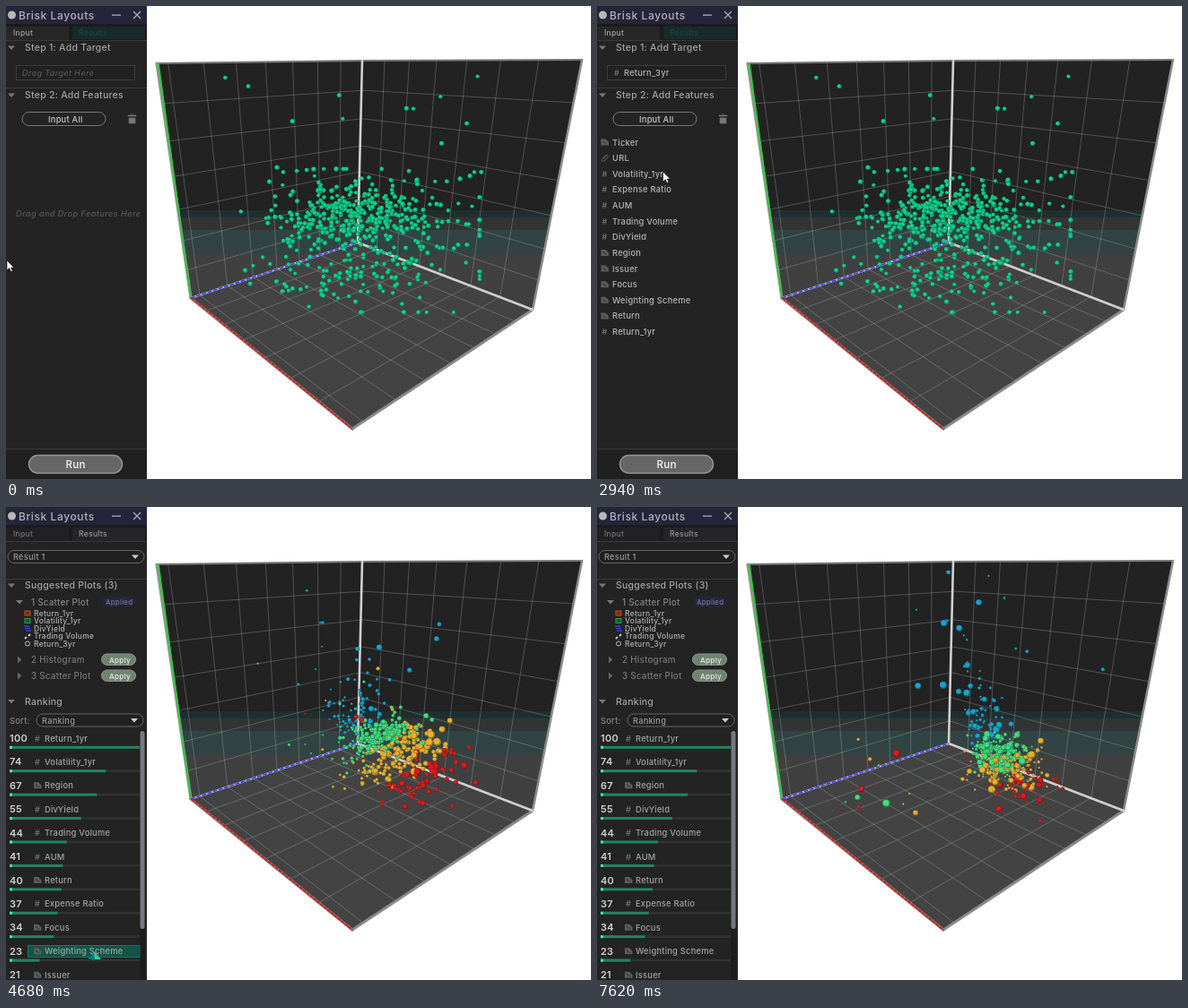
Recreate the animation shown at these times as an HTML page with a canvas. Size 652x528 px, loop 7.68 s.

```html
<!DOCTYPE html>
<html lang="en">
<head>
<meta charset="utf-8">
<title>Feature ranking</title>
<style>
html, body { margin: 0; width: 652px; height: 528px; overflow: hidden; background: #fff; }
canvas, svg { position: absolute; left: 0; top: 0; }
svg { overflow: hidden; }
text { font-family: Inter, Roboto, sans-serif; font-weight: 500; letter-spacing: .25px; dominant-baseline: central; white-space: pre; }
</style>
</head>
<body>
<canvas id="box" width="652" height="528"></canvas>
<canvas id="dots" width="652" height="528"></canvas>
<svg id="panel" width="157" height="528"></svg>
<script>
const LOOP = 7680;
const $ = id => document.getElementById(id);
const clamp = (v, a = 0, b = 1) => Math.min(b, Math.max(a, v));
const ease = p => p * p * (3 - 2 * p);
const mix = (a, b, p) => a + (b - a) * p;

// ---- Chart box: back corner O, its neighbours, and the outer corners ----
const O = [392, 264], T = [397, 61], L = [206, 326], TL = [168, 64],
      R = [587, 339], TR = [642, 60], F = [386, 472];
const bx = $('box').getContext('2d');

// Maps the unit square onto a quad in perspective.
function projector([a, b, c, d]) {
  const sx = a[0] - b[0] + c[0] - d[0], sy = a[1] - b[1] + c[1] - d[1];
  const ux = b[0] - c[0], uy = b[1] - c[1], vx = d[0] - c[0], vy = d[1] - c[1];
  const den = ux * vy - vx * uy;
  const g = (sx * vy - vx * sy) / den, h = (ux * sy - sx * uy) / den;
  return (u, v) => [0, 1].map(i =>
    ((b[i] - a[i] + g * b[i]) * u + (d[i] - a[i] + h * d[i]) * v + a[i]) / (g * u + h * v + 1));
}
function line(p, q, color, width, dash = []) {
  bx.strokeStyle = color;
  bx.lineWidth = width;
  bx.setLineDash(dash);
  bx.beginPath();
  bx.moveTo(...p);
  bx.lineTo(...q);
  bx.stroke();
}
function face(quad, fill, cols) {
  bx.fillStyle = fill;
  bx.beginPath();
  quad.forEach(p => bx.lineTo(...p));
  bx.fill();
  const at = projector(quad), ink = 'rgba(190,205,200,.28)';
  for (let k = 1; k < cols; k++) line(at(k / cols, 0), at(k / cols, 1), ink, 1);
  for (let k = 1; k < 7; k++) line(at(0, k / 7), at(1, k / 7), ink, 1);
}
function drawBox() {
  const sky = bx.createLinearGradient(0, 0, 0, 528);
  let last = '#222';
  for (const [y, c] of [[228, '#1f2f2f'], [236, '#323434'], [250, '#324343'], [277, '#404040']]) {
    sky.addColorStop(y / 528, last);
    sky.addColorStop(y / 528, last = c);
  }
  face([O, L, TL, T], sky, 7.3);
  face([O, R, TR, T], sky, 7);
  face([O, L, F, R], '#434343', 7.3);
  bx.lineCap = 'round';
  line(TL, T, '#777', 1.8);
  line(T, TR, '#777', 1.8);
  line(TR, R, '#8c8c8c', 2.5);
  line(F, R, '#8a8a8a', 2.8);
  line(O, R, '#d0d0d0', 2.6);
  line(O, T, '#d0d0d0', 2.6);
  line(TL, L, '#8a9a8a', 3.2);
  line([TL[0] + 2, TL[1]], L, '#1fd02f', 1.6);
  line(L, O, '#c8c8e0', 2.2);
  line(L, F, '#8c8080', 3.2);
  bx.lineCap = 'butt';
  line(L, O, '#3838e8', 1.5, [5, 1.5]);
  line([L[0] + 1, L[1]], F, '#d01818', 1.8, [4, 1]);
}

// ---- Data points ----
let seed = 20;
const rnd = () => (seed = (seed * 16807) % 2147483647) / 2147483647;
const gauss = () => Math.sqrt(-2 * Math.log(rnd())) * Math.cos(2 * Math.PI * rnd());
const COLORS = ['#16a5d0', '#42de84', '#e8b030', '#d61c1e'];

// A dense cloud above the floor and a thinner one below it, sorted by
// position into four colour classes that settle from high to low.
function cloudPoint() {
  const low = rnd() < .2, wide = rnd() < .35 ? 1.45 : 1;
  const x = clamp(393 + 45 * wide * gauss(), 262, 528);
  const y = clamp(low ? 302 + 20 * gauss() : 234 + 18 * wide * gauss(), 182, 342);
  const c = clamp(Math.floor((x - 390) / 90 + (y - 240) / 60 + .35 * gauss() + 1.7), 0, 3);
  const tail = c ? 0 : -30 * Math.log(rnd());
  return {
    x, y, c,
    ex: 438 + 11 * c + (11 + 3.5 * c) * gauss() - tail * .25,
    ey: Math.max(70, 260 + 16 * c + 12 * gauss() - tail)
  };
}
// Strays drift either high up or out over the floor.
function strayPoint(_, i) {
  const high = i % 2;
  return {
    x: 235 + 300 * rnd(), y: 200 - 125 * rnd() ** 2,
    c: high ? 0 : Math.floor(1 + 3 * rnd()),
    ex: high ? 425 + 45 * gauss() : 260 + 100 * rnd(),
    ey: high ? 70 + 130 * rnd() : 240 + 115 * rnd()
  };
}
const points = [...Array.from({ length: 530 }, cloudPoint), ...Array.from({ length: 24 }, strayPoint)];
for (const d of points) {
  d.r = 1.1 + 3 * rnd() ** 3.5;
  d.s = 2.1 + .6 * rnd();
}

const dc = $('dots').getContext('2d');
function disc(x, y, r, color) {
  dc.fillStyle = color;
  dc.beginPath();
  dc.arc(x, y, r, 0, 7);
  dc.fill();
}
function drawDots(t) {
  const p = ease(clamp((t - 4170) / 1020));
  const bump = Math.sin(Math.PI * p);
  dc.clearRect(0, 0, 652, 528);
  for (const d of points) {
    const x = mix(d.x, d.ex, p), y = mix(d.y, d.ey, p);
    const depth = clamp((x - 270) / 150, .5, 1.4);
    const r = mix(d.s, d.r, p) * mix(1, depth, bump);
    disc(x, y, r, p > 0 ? COLORS[d.c] : '#10d28e');
    disc(x, y, r, 'rgba(0,0,0,.36)');
    disc(x - r * .12, y - r * .12, r * .8, p > 0 ? COLORS[d.c] : '#10d28e');
  }
}

// ---- Side panel ----
const txt = (x, y, s, size = 9.3, fill = '#b4b4b4', more = '') =>
  `<text x="${x}" y="${y}" font-size="${size}" fill="${fill}" ${more}>${s}</text>`;
const rect = (x, y, w, h, fill, more = '') =>
  `<rect x="${x}" y="${y}" width="${w}" height="${h}" fill="${fill}" ${more}/>`;
const path = (d, more) => `<path d="${d}" ${more}/>`;
const group = (id, s) => `<g id="${id}">${s}</g>`;
const rule = y => rect(0, y, 157, 1, '#393939');
const down = (x, y, c = '#777') => path(`M${x - 4} ${y - 2}h8l-4 4.5z`, `fill="${c}"`);
const right = (x, y) => path(`M${x - 2} ${y - 4}v8l4.5-4z`, 'fill="#666"');
const italic = 'font-style="italic" style="letter-spacing:.45px"';
const bold = 'style="font-weight:600"';
const heading = (y, s) => down(6, y) + txt(21, y, s, 10.5, '#a2a2a2');
const pick = (x, y, w, s) =>
  rect(x, y, w, 14, '#202020', 'rx="7" stroke="#666"') + txt(x + 6, y + 7, s, 9.2, '#999') + down(x + w - 10, y + 7, '#ccc');
const tabs = (a, b) => txt(8, 29.5, 'Input', 8.6, a) + txt(81, 29.5, 'Results', 8.6, b) + rule(38);

function icon(kind, x, y) {
  if (kind === '#') return txt(x - 3, y, '#', 9, '#777');
  if (kind === 'u') return path(`M${x - 3} ${y + 2}l4-5q3-1 3 2l-4 4q-4 2-3-1M${x - 1} ${y + 1}l2-3`, 'fill="none" stroke="#666"');
  return path(`M${x - 4} ${y - 3.5}h5l3.5 3.5v3.5h-8.500z`, 'fill="#5c5c5c"') +
    path(`M${x - 2} ${y - 1}l4 3`, 'stroke="#2a2a2a"');
}

// First letter: # number, t label, u link.
const features = ['t Ticker', 'u URL', '# Volatility_1yr', '# Expense Ratio', '# AUM', '# Trading Volume', '# DivYield',
  't Region', 't Issuer', 't Focus', 't Weighting Scheme', 't Return', '# Return_1yr'];
const ranking = ['100 # Return_1yr', '74 # Volatility_1yr', '67 t Region', '55 # DivYield', '44 # Trading Volume', '41 # AUM',
  '40 t Return', '37 # Expense Ratio', '34 t Focus', '23 t Weighting Scheme', '21 t Issuer'];

const base = rect(0, 0, 157, 528, '#232323') + rect(0, 0, 157, 20, '#25253a') +
  `<circle cx="6.500" cy="10" r="4.500" fill="#b8b8b8"/>` +
  txt(14, 10, 'Brisk Layouts', 12, '#b2b2b8', 'style="letter-spacing:.6px"') +
  rect(118, 9.5, 10, 1.3, '#aaa') + path('M142 6l8 8m0-8l-8 8', 'stroke="#aaa" stroke-width="1.300"') +
  rect(0, 20, 157, 18, '#1b1b1d');

const featureList = features.map((f, i) => {
  const y = 152 + 17.63 * i;
  return icon(f[0], 8.5, y) + txt(17, y, f.slice(2));
}).join('');

const input = rect(0, 23, 70, 16, '#272727') + rect(74, 23, 81, 14, '#182a2a') + tabs('#a0a0a0', '#1c4644') +
  heading(46.5, 'Step 1: Add Target') + rule(91) + heading(99.5, 'Step 2: Add Features') +
  rect(11.5, 66.5, 132, 16, '#212121', 'id="slot" stroke="#3b3b46"') +
  group('hint', txt(18, 74.5, 'Drag Target Here', 8.9, '#555', italic)) +
  group('target', txt(19, 74.5, '#', 9, '#777') + txt(30, 74.5, 'Return_3yr')) +
  rect(18, 118.5, 93, 15, '#242424', 'rx="7.500" stroke="#777"') + txt(47, 126, 'Input All', 9.3, '#c8c8c8') +
  path('M136 123h9v-1h-9zm1 2h7v6h-7zm2-4h3', 'fill="#777" stroke="#777" stroke-width=".6"') +
  rect(.5, 142, 155.5, 350.5, '#234434', 'id="zone" stroke="#1d9473"') +
  group('empty', txt(11, 231.5, 'Drag and Drop Features Here', 9.1, '#575757', italic)) +
  group('list', featureList) + rule(494) + rect(0, 495, 157, 33, '#202020') +
  rect(25.5, 501.5, 104, 20, '#666', 'id="run" rx="10" stroke="#929292" stroke-width="1.500"') +
  txt(66.5, 511.5, 'Run', 11.5, '#e6e6e6', bold);

const rows = ranking.map((row, i) => {
  const y = 258 + 26.42 * i, [, n, kind, name] = row.match(/(\d+) (.) (.+)/);
  return txt(4, y, n, 11, '#d2d2d2', bold) + icon(kind, 35, y) + txt(43, y, name, 9.3, '#a4a4a4') +
    rect(4, y + 9, 145, 2.5, '#323232') + rect(4, y + 8.8, n * 1.45, 3, '#208662') + rect(4, y + 8.8, 3, 3, '#48e8a8');
}).join('');

const legend = ['Return_1yr', 'Volatility_1yr', 'DivYield', 'Trading Volume', 'Return_3yr']
  .map((s, i) => txt(31, 118.5 + 8.5 * i, s, 8.5, '#b0b0b0')).join('') +
  rect(21, 116, 6, 5, '#7a2a14', 'stroke="#d04a20"') + rect(21, 124.5, 6, 5, '#145a30', 'stroke="#20a050"') +
  path('M20 133h6m-5 2.500h6m-5 2.500h6', 'stroke="#2848c8" stroke-width="1.300"') +
  path('M21 147l2-2m2-1l2-2', 'stroke="#ccc" stroke-width="1.800"') +
  `<circle cx="24" cy="152.500" r="2.500" fill="none" stroke="#bbb"/>`;

const plot = (y, s) => right(15, y) + txt(28, y, s, 9.8, '#777') +
  rect(106.5, y - 6.5, 38, 12.5, '#708270', 'rx="6.200" stroke="#879887"') + txt(115, y, 'Apply', 8.2, '#e8e8e8');

const results = rect(0, 23, 70, 15, '#212123') + rect(74, 23, 81, 16, '#252527') + tabs('#747474', '#959595') +
  pick(2, 48.5, 152, 'Result 1') + rule(80) + heading(87.5, 'Suggested Plots (3)') +
  down(15, 106) + txt(28, 106, '1 Scatter Plot', 9.8, '#858585') +
  rect(107, 99.5, 38, 12, '#25253a', 'rx="6"') + txt(111, 105.5, 'Applied', 7.8, '#77779a') +
  legend + plot(170.5, '2 Histogram') + plot(188.5, '3 Scatter Plot') +
  heading(217, 'Ranking') + txt(4, 238, 'Sort:', 9.3, '#858585') + pick(34, 231, 119, 'Ranking') +
  rect(24.5, 489.5, 125, 13, '#145446', 'id="hover" stroke="#1a7460"') + rows +
  rect(149.5, 249, 5.5, 279, '#1c1c1c') + rect(149.5, 250, 5, 221, '#777780', 'rx="2.500"');

const ghost = (id, kind, s) => group(id, rect(0, 0, 104, 17, '#1b1e1d', 'opacity=".9"') +
  icon(kind, 11, 8) + txt(kind === '#' ? 22 : 15, 8, s, 9.3, '#969696'));
const arrow = group('arrow', path('M0 0V11L2.700 8.600 4.600 12.500 6.400 11.700 4.600 8H8Z', 'fill="#fff" stroke="#111" stroke-width=".6"'));
const grab = group('grab', path('M-7 6L1-1V8Z', 'fill="#0d7c80"') + path('M0-2L8 7H1Z', 'fill="#3cc8ac"'));

$('panel').innerHTML = base + group('input', input) + group('results', results) +
  ghost('ghost1', '#', 'Return_3yr') + ghost('ghost2', 't', 'Weighting Scheme') + arrow + grab;

// Pointer stops: time, x, y
const stops = [
  [0, 1, 284], [150, -14, 282], [570, 105, 63], [1050, 97, 66], [1650, 105, 66], [2100, 109, 92],
  [2370, 109, 96], [2700, 68, 122], [3150, 78, 236], [3720, 98, 498], [5400, 98, 498], [5790, 170, 498], [LOOP, 170, 498]
];
function pointer(t) {
  const i = stops.findIndex(s => s[0] > t), a = stops[i - 1], b = stops[i];
  const p = ease((t - a[0]) / (b[0] - a[0]));
  return [mix(a[1], b[1], p), mix(a[2], b[2], p)];
}
const show = (id, on) => $(id).style.display = on ? '' : 'none';
const move = (id, x, y) => $(id).setAttribute('transform', `translate(${x.toFixed(2)} ${y.toFixed(2)})`);

const DROP = 1680, FILL = 2730, DONE = 4110, GRAB = 5190, LEAVE = 5790;
function render(t) {
  const [x, y] = pointer(t);
  const dragging = t >= 150 && t < DROP, done = t >= DONE;
  show('input', !done);
  show('results', done);
  show('zone', dragging);
  show('hint', t < DROP);
  show('target', t >= DROP);
  show('empty', t < FILL);
  show('list', t >= FILL);
  $('slot').setAttribute('stroke', dragging ? '#1d9473' : '#3b3b46');
  $('slot').setAttribute('stroke-width', dragging ? 1.6 : 1);
  $('run').setAttribute('fill', t > 3660 ? '#526663' : '#666');
  show('hover', t < 5700);
  show('ghost1', dragging);
  show('ghost2', t >= GRAB && t < LEAVE);
  show('arrow', !done);
  show('grab', done && t < LEAVE);
  move('ghost1', x - 52, y - 5);
  move('ghost2', x + 1, y - 14);
  move('arrow', x, y);
  move('grab', x, y);
  drawDots(t);
}

drawBox();
function tick() {
  render(performance.now() % LOOP);
  requestAnimationFrame(tick);
}
tick();
</script>
</body>
</html>
```
